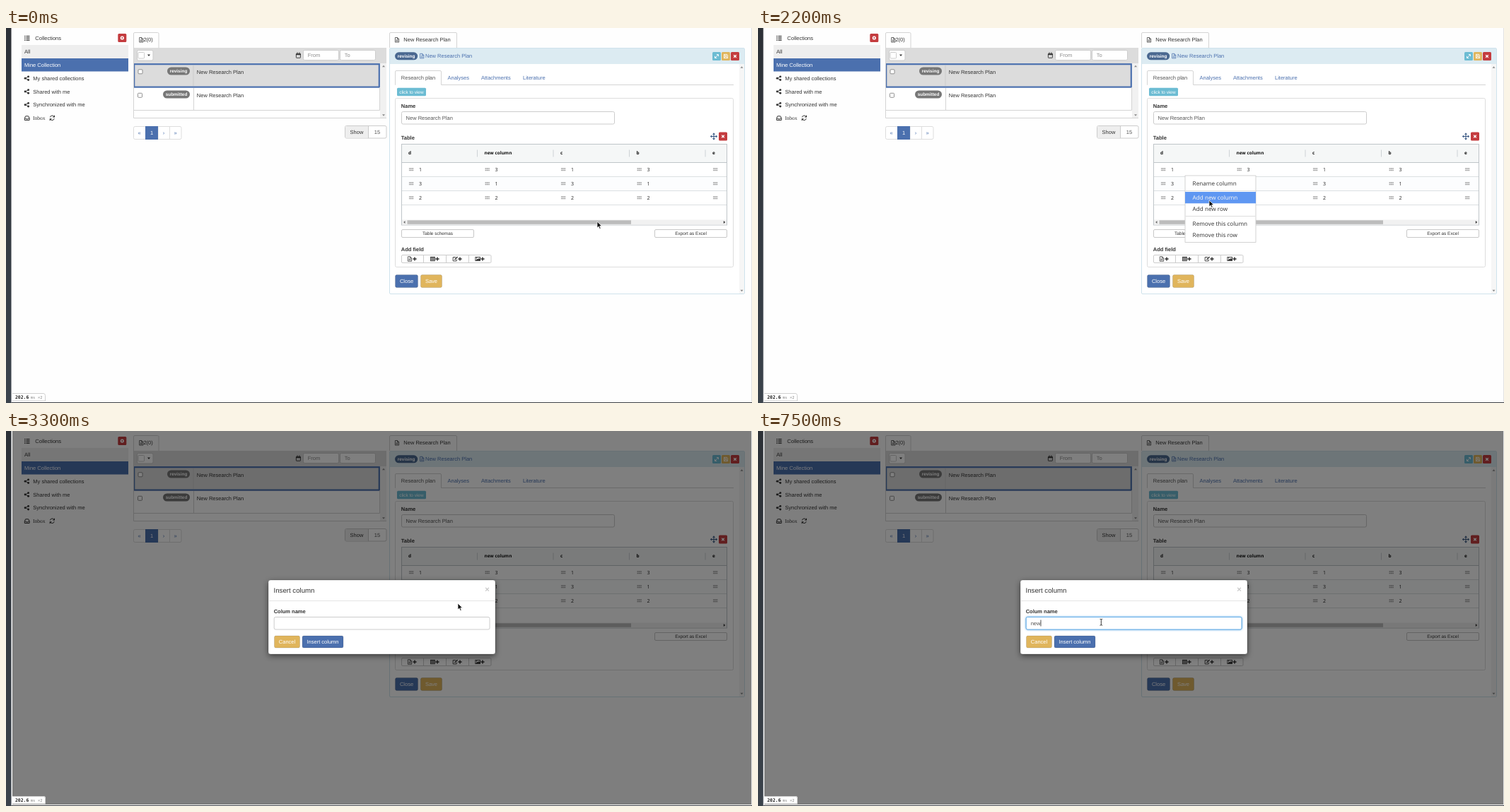
An HTML page for the animation above (8000 ms loop, 1055 px wide and 531 px high).

```html
<!DOCTYPE html>
<html lang="en">
<head>
<meta charset="utf-8">
<title>Insert column</title>
<style>
html, body { margin: 0; width: 100%; height: 100%; overflow: hidden; background: #fefefe; }
svg { display: block; width: 1055px; height: 531px; }
text { font: 7.5px "Liberation Sans", Arial, sans-serif; fill: #333; white-space: pre; text-rendering: geometricPrecision; }
.b { font-weight: bold; }
.s { font-size: 6.43px; }
.grid { font: 7px "Open Sans", sans-serif; fill: #222; }
.head { font: bold 6.4px "Open Sans", sans-serif; fill: #111; }
.menu { font: 8.15px "Noto Sans", sans-serif; fill: #3c3c3c; }
.mono { font: 5.4px "DejaVu Sans Mono", monospace; fill: #888; }
</style>
</head>
<body>
<svg id="stage" viewBox="0 0 1055 531" xmlns="http://www.w3.org/2000/svg"></svg>
<script>
const BLUE = '#4b70ae', GOLD = '#e0b55c', RED = '#c43c3f', CYAN = '#6cbcd3', LINE = '#d4d4d4', INK = '#333';

// Drawing helpers
const rect = (x, y, w, h, fill, stroke = 'none', r = 0, sw = 1) =>
  `<rect x="${x}" y="${y}" width="${w}" height="${h}" rx="${r}" fill="${fill}" stroke="${stroke}" stroke-width="${sw}"/>`;
const text = (x, y, s, cls = '', extra = '') => `<text x="${x}" y="${y}" class="${cls}" ${extra}>${s}</text>`;
const mid = (x, y, s, cls = '', color = INK) => text(x, y, s, cls, `text-anchor="middle" style="fill:${color}"`);
const tint = (x, y, s, color, cls = '') => text(x, y, s, cls, `style="fill:${color}"`);
const line = (d, stroke = LINE, sw = 1) => `<path d="${d}" fill="none" stroke="${stroke}" stroke-width="${sw}"/>`;
const fill = (d, color = INK) => `<path d="${d}" fill="${color}"/>`;
const group = (id, body, extra = '') => `<g id="${id}" ${extra}>${body}</g>`;

// Icons, placed by their centre
const doc = (x, y, c = INK) =>
  line(`M${x - 2.6} ${y - 3.3}h3.2l2 2v4.6h-5.2zM${x + .4} ${y - 3.3}v2.2h2.2M${x - 1.4} ${y + .2}h2.8M${x - 1.4} ${y + 1.7}h2.8`, c, .75);
const share = (x, y) => line(`M${x + 2.4} ${y - 2.3}L${x - 2.2} ${y}L${x + 2.4} ${y + 2.3}`, INK, .9) +
  [[2.3, -2.3], [-2.2, 0], [2.3, 2.3]].map(([a, b]) => `<circle cx="${x + a}" cy="${y + b}" r="1.45" fill="${INK}"/>`).join('');
const plus = (x, y) => line(`M${x - 2.6} ${y}h5.2M${x} ${y - 2.6}v5.2`, INK, 1.5);
const tri = (x, y, dx, dy, c = '#8a8a8a') =>
  fill(dx ? `M${x + dx} ${y}L${x - dx} ${y - 2}V${y + 2}z` : `M${x} ${y + dy}L${x - 2} ${y - dy}H${x + 2}z`, c);
const cross = (x, y) => line(`M${x - 1.8} ${y - 1.8}l3.6 3.6m0 -3.6l-3.6 3.6`, '#fff', 1.3);
const grip = (x, y) => line(`M${x - 3} ${y - 1.3}h6M${x - 3} ${y + 1.3}h6`, '#777', 1.5).replace('/>', ' stroke-dasharray="1 .7"/>');
const check = (x, y) => rect(x - 3, y - 3, 6, 6, '#fff', '#777', 1, .8);
const badge = (x, y, w, s, c) => rect(x, y, w, 11, c, 'none', 5.5) + mid(x + w / 2, y + 7.6, s, 's b', '#fff');
const button = (x, y, w, h, s, c) => rect(x + .5, y + .5, w - 1, h - 1, c, 'rgba(0,0,0,.12)', 2) + mid(x + w / 2, y + h / 2 + 2.6, s, '', '#fff');
const flat = (x, w, s) => rect(x + .5, 285.5, w - 1, 11, '#fff', '#c8c8c8', 1.5) + mid(x + w / 2, 293.4, s, 's');
const small = (x, y, c) => rect(x, y, 12, 12, c, 'none', 1.5);

function sidebar() {
  let s = line('M28.5 11.5h5M28.5 13.5h5M28.5 15.5h5M28.5 17.5h5', INK, 1.1) + line('M26 11.5h1.5M26 13.5h1.5M26 15.5h1.5M26 17.5h1.5', INK, 1.1);
  s += text(41.3, 17.2, 'Collections') + small(158.3, 8, RED) + `<circle cx="164.3" cy="14" r="1.8" fill="none" stroke="#fff" stroke-width="1.6"/>`;
  s += rect(22, 24, 151, 19, '#eee') + text(26, 36.1, 'All') + rect(22, 43, 151, 18.5, BLUE) + tint(26, 54.8, 'Mine Collection', '#fff');
  ['My shared collections', 'Shared with me', 'Synchronized with me'].forEach((label, i) => {
    const y = 71.2 + i * 18.75;
    s += share(29.3, y) + text(38.3, y + 2.7, label);
  });
  s += line('M26.3 127.6l1.4-2.8h4l1.4 2.8v2.9h-6.8zM26.3 128h2l.6 1h1.8l.6-1h2', INK, 1);
  s += text(38, 130.2, 'Inbox', '', 'style="font-family:\'Liberation Serif\',serif"');
  s += line('M62.4 126.4a3 3 0 0 1 5.4-1.1M68.2 128.2a3 3 0 0 1-5.4 1.1', INK, 1) + fill('M69 123.2v3.2h-3.2zM61.7 131.4v-3.2h3.2z');
  return s;
}

function list() {
  let s = rect(180, 28, 358, 100, '#fff') + rect(180, 28, 358, 22, '#dcdcdc') + rect(529, 50, 9, 78, '#f1f1f1');
  s += line('M180.5 28V8q0-1.5 1.5-1.5h32.500q1.500 0 1.500 1.500V28') + doc(191.3, 16.8) + text(194.4, 19.3, '2(0)');
  s += rect(185.5, 31.5, 22.5, 14.5, '#fdfdfd', '#ccc', 2) + rect(187, 34.500, 8.500, 8.500, '#fff', '#ccc', 1) + tri(202, 38.8, 0, 1.3, INK);
  s += rect(410.4, 36.300, 6, 6, 'none', INK, .5, .9) + line('M410 37.400h7', INK, 1.600) + line('M412 34.500v2M415 34.500v2', INK, 1);
  [[420.5, 'From'], [472.5, 'To']].forEach(([x, label]) => {
    s += rect(x, 31.5, 50, 14, '#fff', '#ccc', 2) + tint(x + 6.2, 41.2, label, '#8c8c8c');
  });
  s += rect(181.2, 51.2, 346.600, 32.400, '#dcdcdc', BLUE, 0, 2.200) + line('M265.500 85v32M180.500 116.500H528.500V84M180.500 28V127.500H538', LINE);
  s += line('M265 53V82', '#cbcbcb') + check(190, 61.8) + check(189.500, 95.3);
  s += badge(228, 55.5, 32, 'revising', '#777') + badge(222, 88.5, 38, 'submitted', '#777');
  s += text(269.8, 64.7, 'New Research Plan') + text(269.8, 98.1, 'New Research Plan');
  s += tri(534, 54, 0, -1.2) + tri(534, 123.500, 0, 1.2);
  s += rect(180.5, 139.5, 67.500, 18, '#fff', '#ddd', 2) + line('M215 139.500v18M231.500 139.500v18', '#ddd') + rect(197, 139, 18, 19, BLUE);
  [[188.5, '«'], [206, '1'], [223, '›'], [239.700, '»']].forEach(([x, c]) => s += mid(x, 150.8, c, '', c === '1' ? '#fff' : BLUE));
  s += rect(479.5, 138.5, 58.5, 17.5, '#fff', '#ccc', 2) + rect(480, 139, 32, 16.5, '#eee') + line('M512.5 138.500v17.500', '#ccc');
  return s + mid(496, 149.8, 'Show') + mid(525, 149.8, '15', '', '#555');
}

function table() {
  let s = rect(559.5, 164.5, 460, 114.5, '#fff', '#bfc5c9') + rect(560, 165, 459, 25, '#f5f7f7') + rect(560, 210, 459, 20, '#fcfdfe');
  s += rect(560, 191, 459, 19, '#ecf1f9').replace('<rect', '<rect id="hover"');
  s += line('M560 190.500h459', '#bfc5c9') + line('M560 210.500h459M560 230.500h459M560 250.500h459', '#dce0e2');
  const rows = ['1313', '3131', '2222'];
  ['d', 'new column', 'c', 'b', 'e'].forEach((name, i) => {
    const x = 559 + i * 107.5;
    s += text(x + 10, 179.4, name, 'head');
    if (i < 4) s += line(`M${x + 107.5} 172.500v10`, '#cdd2d5');
    rows.forEach((row, j) => {
      const y = 200.2 + j * 20;
      s += grip(x + 14.2, y) + text(x + 25, y + 2.5, row[i] || '', 'grid');
    });
  });
  s += rect(559.5, 190.5, 107, 19.500, 'none', '#76a3d4').replace('<rect', '<rect id="cell"');
  s += rect(560, 271.5, 459, 7, '#f1f1f1') + rect(567.5, 272.3, 316.5, 5.5, '#bcbcbc');
  return s + tri(563.3, 275, -1.200, 0, '#666') + tri(1016, 275, 1.200, 0, '#333');
}

function detail() {
  let s = rect(542.5, 28.5, 502, 348, '#fff', '#cfe3ec', 1.5) + rect(543, 29, 501, 22, '#dcebf2') + rect(1037, 51, 7, 325, '#f6f6f6');
  s += line('M542.500 28V8q0-1.500 1.500-1.500h92q1.500 0 1.500 1.500V28') + doc(553, 16.8) + text(562.3, 19.4, 'New Research Plan');
  s += badge(550, 34.3, 32.2, 'revising', '#4a6890') + doc(588.2, 39.6, BLUE) + tint(593, 42.4, 'New Research Plan', BLUE);
  s += small(999, 34, CYAN) + line('M1003 42l4-4M1004.800 37.500h2.700v2.700M1002.500 39.800v2.700h2.700', '#fff', .9);
  s += small(1012, 34, GOLD) + line('M1015.300 37.300h4.200l1.200 1.200v4.200h-5.400zM1016.500 37.500v1.800h2.600v-1.800M1016.500 42.500v-1.800h3v1.800', '#fff', .8);
  s += small(1025, 34, RED) + cross(1031, 40) + tri(1040.5, 55.500, 0, -1.2) + tri(1040.500, 372, 0, 1.2);
  s += line('M550 80.500h.5V62q0-1.500 1.500-1.500h62q1.500 0 1.500 1.500V80.500H1029') + tint(558.8, 72.7, 'Research plan', '#555');
  [[624.5, 'Analyses'], [672, 'Attachments'], [731, 'Literature']].forEach(([x, label]) => s += tint(x, 72.7, label, BLUE));
  s += rect(553, 84.7, 41, 11.6, CYAN, 'none', 1.5) + mid(573.4, 92.700, 'click to view', 's', '#fff');
  s += rect(550.5, 99.5, 478, 239, '#fff', '#ddd', 2) + text(558.8, 113, 'Name', 'b');
  s += rect(559.5, 118.5, 301, 17.5, '#fff', '#ccc', 2) + tint(565.6, 130.1, 'New Research Plan', '#555');
  s += text(558.8, 158.2, 'Table', 'b') + small(1008, 147.5, RED) + cross(1014, 153.5);
  s += line('M997.500 153.500h7M1001 150v7', '#3e5c86', 1.1);
  s += fill('M1001 148.300l2 2.400h-4zM1001 158.700l2-2.400h-4zM995.800 153.500l2.400-2v4zM1006.200 153.500l-2.400-2v4z', '#3e5c86');
  s += table() + flat(559, 103, 'Table schemas') + flat(917, 103, 'Export as Excel') + text(558.8, 315.800, 'Add field', 'b');
  s += rect(559.5, 321.5, 126.5, 11, '#fff', '#ccc', 1.5) + line('M590.500 322v10M622.500 322v10M654.500 322v10', '#ccc');
  s += doc(571, 327) + rect(600.500, 324.300, 6, 5.400, 'none', INK, 0, .9) + line('M600.500 325h6M600.500 327.300h6M602.500 324v6M604.500 324v6', INK, .8);
  s += line('M636 324.500h-3.800v5.400h5v-2.400', INK, .9) + line('M634.500 328l4-4', INK, 1.500);
  s += rect(663.900, 324.400, 6.600, 5.200, 'none', INK, 0, .9) + fill('M664.500 329l1.800-2.200 1 .8 1.500-1.800 1.400 1.600v1.600z') + rect(665, 325.200, 1.200, 1.200, INK);
  [578, 610, 642, 674].forEach(x => s += plus(x, 327));
  return s + button(550, 349, 33, 19, 'Close', BLUE) + button(586, 349, 31, 19, 'Save', GOLD);
}

function dialog() {
  let s = rect(371, 211, 321, 105, '#fff', 'rgba(0,0,0,.25)', 3.2, .8).replace('/>', ' filter="url(#shadow)"/>');
  s += text(378.6, 229.3, 'Insert column', '', 'style="font-size:9.64px"') + line('M371.500 240.500h320', '#e5e5e5');
  s += mid(680.5, 228.2, '×', 'b', '#c8c8c8').replace('fill:', 'font-size:11.25px;fill:');
  s += text(378.7, 257.8, 'Colum name', 'b') + rect(379.2, 263.5, 304.8, 17.5, '#fff', '#ccc', 2);
  s += group('focus', rect(379.2, 263.5, 304.8, 17.5, '#66afe9', '#66afe9', 2).replace('/>', ' filter="url(#glow)"/>') +
    rect(379.2, 263.5, 304.8, 17.5, '#fff', '#66afe9', 2));
  s += tint(385.7, 274.9, '', '#555').replace('<text', '<text id="typed"') + rect(0, 267.5, .8, 9, '#222').replace('<rect', '<rect id="caret"');
  return s + button(379, 289.5, 37, 18, 'Cancel', GOLD) + button(418.5, 289.5, 59, 18, 'Insert column', BLUE);
}

const items = [['Rename column', 219.8], ['Add new column', 240.1], ['Add new row', 256.4], ['Remove this column', 276.8], ['Remove this row', 293]];
const menu = () => rect(604, 209, 100, 94.5, '#fff', '#c9c9c9', 0, .8) + line('M604.500 230.500h99M604.500 266.500h99', '#dedede') +
  rect(604, 0, 100, 16.3, '#5f97f2').replace('<rect', '<rect id="mark"') +
  items.map(([label, y]) => text(614.6, y + 2.8, label, 'menu item')).join('');

const stage = document.getElementById('stage');
stage.innerHTML = `<defs>
  <linearGradient id="dark" x2="0" y2="1"><stop stop-color="#2c3036"/><stop offset="1" stop-color="#3b434c"/></linearGradient>
  <filter id="shadow" x="-10%" y="-20%" width="120%" height="150%"><feDropShadow dx="0" dy="2.700" stdDeviation="4" flood-opacity=".5"/></filter>
  <filter id="glow" x="-5%" y="-50%" width="110%" height="200%"><feGaussianBlur stdDeviation="1.800"/></filter></defs>` +
  rect(0, 0, 1055, 531, '#fefefe') + rect(0, 0, 7.5, 531, 'url(#dark)') + sidebar() + list() + detail() +
  rect(9, 0, 1045, 529, '#000').replace('<rect', '<rect id="shade"') +
  rect(1054, 0, 1, 531, '#e2e2e2') + rect(7.5, 530, 1047.5, 1, '#3c3f44') +
  fill('M9 517H53q3 0 3 3V528H9z', '#fff') + line('M9 517.500H53q2.500 0 2.500 3V528H9', '#c4c4c4', .8) +
  text(13, 525.2, '202.6', 'mono', 'style="font-size:6.400px;font-weight:bold;fill:#222"') + text(34.8, 525.2, 'ms', 'mono') + text(45, 525.2, '×2', 'mono') +
  group('dialog', dialog()) + group('menu', menu()) + group('cover', flat(559, 103, 'Table schemas'), 'opacity=".4"') +
  group('arrow', '<path d="M0 0V9L2.100 7.100L3.600 10.400L5.100 9.700L3.700 6.500H6.500z" fill="#111" stroke="#fff" stroke-width=".7"/>') +
  group('beam', line('M-1.800 -4.500q1.800 0 1.800 1V3.500q0 1-1.800 1M1.800 -4.500q-1.800 0-1.800 1M1.800 4.500q-1.800 0-1.800-1', '#222', .9));

const part = id => document.getElementById(id);
const [hover, cell, shade, modal, focus, typed, caret, popup, mark, cover, arrow, beam] =
  ['hover', 'cell', 'shade', 'dialog', 'focus', 'typed', 'caret', 'menu', 'mark', 'cover', 'arrow', 'beam'].map(part);
const labels = [...document.querySelectorAll('.item')];

// Step tables: [start in ms, value...]
const pointer = [[0, 836, 274], [200, 826, 268], [300, 762, 244], [400, 670, 214], [500, 570, 190], [600, 575, 188],
  [800, 576, 181], [900, 580, 176], [1000, 594, 189], [1100, 608, 200], [1300, 606, 204], [1400, 603, 206],
  [1800, 616, 226], [1900, 632, 278], [2000, 636, 318], [2100, 633, 241], [2200, 638, 244], [2600, 637, 245], [2700, 636, 245],
  [2800, 639, 244], [3400, 630, 250], [3500, 596, 261], [3600, 545, 271], [3700, 510, 277], [3800, 493, 276], [4700, 485.3, 270.7]];
const typing = [[0, ''], [4700, 'te'], [4900, 'tes'], [5300, 'test'], [6300, 'tes'], [6800, 't'], [6900, ''], [7300, 'n'], [7500, 'new']];
const marked = [[0, -1], [1800, 0], [1900, 3], [2000, -1], [2100, 1], [3200, -1]];
const menuAlpha = [[0, 0], [1600, 1], [3200, .4], [3300, 0]];
const modalAlpha = [[0, 0], [3200, .5], [3300, 1]];
const shadeAlpha = [[0, 0], [3200, .19], [3300, .5]];
const focusAlpha = [[0, 0], [4100, .35], [4200, .8], [4300, 1]];
const at = (steps, t) => steps.findLast(step => step[0] <= t);
const within = (t, from, to) => t >= from && t < to;
const show = (el, on) => el.setAttribute('visibility', on ? 'visible' : 'hidden');
const fade = (el, steps, t) => el.setAttribute('opacity', at(steps, t)[1]);

function draw(t) {
  const [, x, y] = at(pointer, t), text = at(typing, t)[1], pick = at(marked, t)[1], overInput = t >= 3600;
  show(arrow, !overInput);
  show(beam, overInput);
  (overInput ? beam : arrow).setAttribute('transform', `translate(${x} ${y})`);
  show(hover, within(t, 1300, 1800));
  show(cell, within(t, 1500, 1800));
  fade(popup, menuAlpha, t);
  fade(modal, modalAlpha, t);
  fade(shade, shadeAlpha, t);
  fade(focus, focusAlpha, t);
  show(cover, within(t, 3200, 3300));
  show(mark, pick >= 0);
  if (pick >= 0) mark.setAttribute('y', items[pick][1] - 8.1);
  labels.forEach((el, i) => el.style.fill = i === pick ? '#f4f4f4' : '');
  if (typed.textContent !== text) typed.textContent = text;
  show(caret, t >= 4400 && !within(t, 5600, 6200));
  caret.setAttribute('x', 385.8 + (text ? typed.getComputedTextLength() : 0));
}

const start = performance.now();
function tick() {
  draw((performance.now() - start) % 8000);
  requestAnimationFrame(tick);
}
tick();
</script>
</body>
</html>
```
